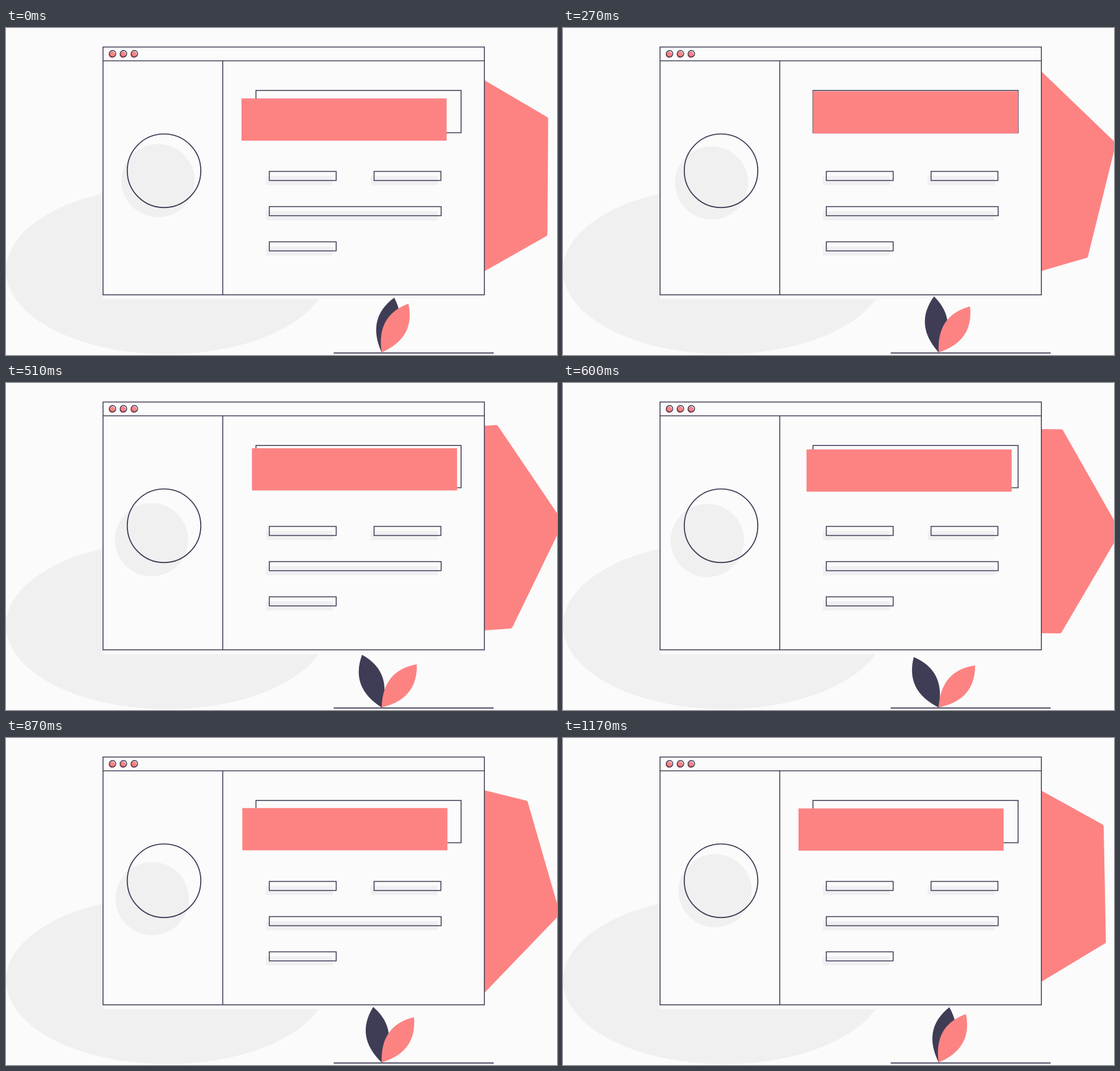
Recreate the animation shown at these times as an HTML page with a canvas. Size 971x576 px, loop 1.2 s.

```html
<!DOCTYPE html>
<html lang="en">
<head>
<meta charset="utf-8">
<title>Window illustration</title>
<style>
  html, body { margin: 0; width: 100%; height: 100%; overflow: hidden; background: #fbfbfb; }
  canvas { display: block; }
</style>
</head>
<body>
<canvas id="stage" width="971" height="576"></canvas>
<script>
const ctx = document.getElementById('stage').getContext('2d');
const LOOP = 1200, STEP = 30;
const PAPER = '#fbfbfb', INK = '#3f3d56', CORAL = '#fd8383', GREY = '#f0f0f0', LILAC = '#f1eff2';

const rad = deg => deg * Math.PI / 180;

// 0 before `from`, 1 after `to`, linear in between.
const ramp = (p, from, to) => Math.min(1, Math.max(0, (p - from) / (to - from)));

function fillRect(color, x, y, w, h) {
  ctx.fillStyle = color;
  ctx.fillRect(x, y, w, h);
}

function strokeRect(x, y, w, h) {
  ctx.lineWidth = 1.6;
  ctx.strokeRect(x, y, w, h);
}

function line(x1, y1, x2, y2, width = 1.6) {
  ctx.lineWidth = width;
  ctx.beginPath();
  ctx.moveTo(x1, y1);
  ctx.lineTo(x2, y2);
  ctx.stroke();
}

function ellipse(color, x, y, rx, ry = rx) {
  ctx.fillStyle = color;
  ctx.beginPath();
  ctx.ellipse(x, y, rx, ry, 0, 0, 2 * Math.PI);
  ctx.fill();
}

function ring(x, y, r, width) {
  ctx.lineWidth = width;
  ctx.beginPath();
  ctx.arc(x, y, r, 0, 2 * Math.PI);
  ctx.stroke();
}

function hexagon(cx, cy, r, deg) {
  const corner = i => [cx + r * Math.cos(rad(deg + 60 * i)), cy + r * Math.sin(rad(deg + 60 * i))];
  const [ax, ay] = corner(0), [bx, by] = corner(1);
  ctx.fillStyle = CORAL;
  ctx.beginPath();
  ctx.moveTo((ax + bx) / 2, (ay + by) / 2);
  for (let i = 1; i <= 6; i++) ctx.arcTo(...corner(i), ...corner(i + 1), 4);
  ctx.closePath();
  ctx.fill();
}

function leaf(color, length, deg) {
  ctx.save();
  ctx.translate(662, 571.5);
  ctx.rotate(rad(deg));
  ctx.fillStyle = color;
  ctx.beginPath();
  ctx.moveTo(0, 0);
  ctx.quadraticCurveTo(-40, -length * 0.53, 0, -length);
  ctx.quadraticCurveTo(40, -length * 0.53, 0, 0);
  ctx.fill();
  ctx.restore();
}

function field(x, row, width) {
  const y = 252.6 + 62 * row;
  fillRect(LILAC, x - 6, y + 8, width, 16);
  strokeRect(x, y, width, 16);
}

function windowFrame() {
  fillRect(PAPER, 171, 33.5, 672, 444);
  strokeRect(171, 33.5, 672, 436.5);
  line(171, 57.7, 843, 57.7);
  line(382, 57.7, 382, 470);
  for (let i = 0; i < 3; i++) {
    const x = 187.8 + 19.2 * i;
    ellipse(CORAL, x - 1.2, 47, 5.7);
    ring(x, 45.3, 5.7, 1.6);
  }
}

function avatar(p) {
  // the shadow drifts left, then down, then back home
  const left = ramp(p, 0, 0.55), down = ramp(p, 0.55, 0.74), home = ramp(p, 0.74, 0.975);
  ellipse(GREY, 268 - 15 * left + 5 * down + 10 * home, 269 + 9.3 * left + 5 * down - 14.3 * home, 64.5);
  ring(278.5, 251.4, 64.8, 1.9);
}

function banner(p) {
  const lift = ramp(p, 0, 0.25) - ramp(p, 0.25, 0.75);
  strokeRect(440.5, 110, 361.5, 74.5);
  fillRect(CORAL, 415 + 28.3 * lift, 124.1 - 14.1 * lift, 361.5, 74.4);
}

function plant(p) {
  const sway = ramp(p, 0, 0.5) - ramp(p, 0.5, 1);
  leaf(INK, 99, 12.9 - 39.2 * sway);
  leaf(CORAL, 98, 28.8 + 12.2 * sway);
  line(577.5, 572.4, 859.5, 572.4, 2);
}

function draw(p) {
  fillRect(PAPER, 0, 0, 971, 576);
  ctx.strokeStyle = INK;
  ellipse(GREY, 284, 427, 284, 147.5);
  hexagon(775, 260.5, 207.6, 30.4 + 60 * p);
  windowFrame();
  avatar(p);
  field(464, 0, 117.8);
  field(648.6, 0, 117.8);
  field(464, 1, 302.8);
  field(464, 2, 117.8);
  banner(p);
  plant(p);
}

const start = performance.now();
function tick() {
  const t = (performance.now() - start) % LOOP;
  draw(Math.floor(t / STEP) * STEP / LOOP);
  requestAnimationFrame(tick);
}
tick();
</script>
</body>
</html>
```
